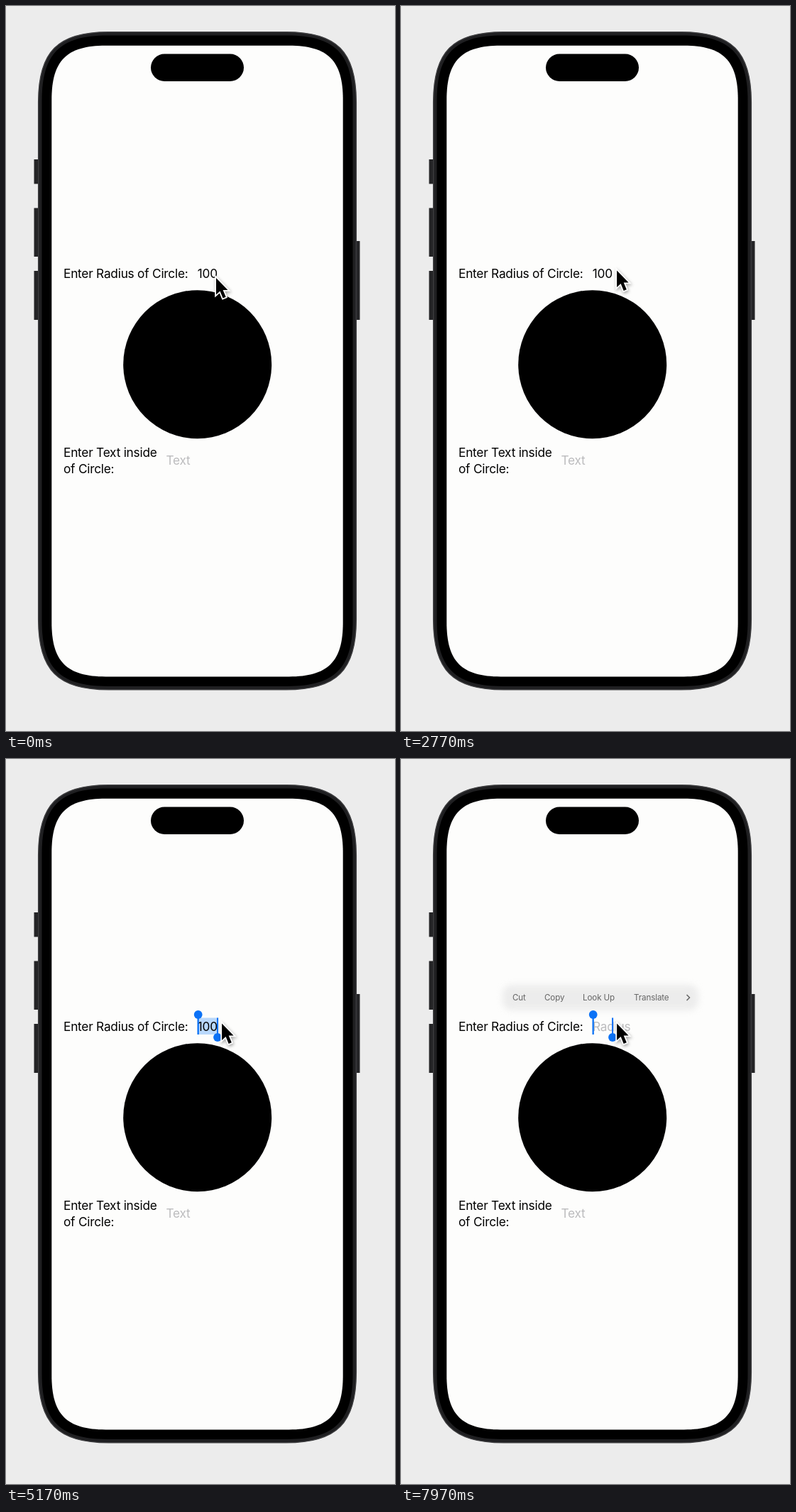
These frames come from a looping animation (548 by 1021 pixels, 8000 ms). An HTML page:

```html
<!DOCTYPE html>
<html lang="en">
<head>
<meta charset="utf-8">
<title>Circle radius demo</title>
<style>
  html, body { margin: 0; width: 100%; height: 100%; overflow: hidden; background: #ececec; }
  svg { display: block; width: 548px; height: 1021px; }
  text { font: 17.3px Inter, sans-serif; letter-spacing: -.24px; }
  .hint { fill: #bcbcbe; }
  #menu text { font-size: 11.6px; letter-spacing: -.1px; }
  #menu rect { filter: blur(5px); }
  #cursor { filter: drop-shadow(1px 2px 2px rgba(0, 0, 0, .35)); }
</style>
</head>
<body>
<svg viewBox="0 0 548 1021">
  <rect width="548" height="1021" fill="#ececec"/>
  <path d="M39.500 216h8v34.500h-8zM39.500 284.500h8v68.500h-8zM39.500 373h8v69h-8zM491 331h7.500v111h-7.500z" fill="#242426"/>
  <path id="body" fill="#1f1f21" stroke="#3b3b3d" stroke-width="1.5"/>
  <path id="bezel"/>
  <path id="screen" fill="#fdfdfc"/>
  <rect x="204" y="67.500" width="131" height="38.500" rx="19.250"/>

  <text x="81" y="383">Enter Radius of Circle:</text>
  <circle cx="269.700" cy="504.700" r="104.500"/>
  <text x="81" y="635">Enter Text inside</text>
  <text x="81" y="657.500">of Circle:</text>
  <text class="hint" x="225.500" y="646">Text</text>

  <rect id="highlight" x="270" y="364.500" width="29" height="23.500" fill="#b9d8fb"/>
  <text id="value" x="269.800" y="383">100</text>
  <text id="hint" class="hint" x="270" y="383">Radius</text>

  <g id="menu">
    <rect x="143" y="318" width="276" height="36" rx="13" fill="#e2e2e2"/>
    <text x="157" y="340">Cut</text>
    <text x="202" y="340">Copy</text>
    <text x="256" y="340">Look Up</text>
    <text x="328" y="340">Translate</text>
    <path d="M402.500 332l4 4-4 4" fill="none" stroke="#000" stroke-width="1.500"/>
  </g>

  <g id="handles" fill="#0b72f6">
    <rect x="269.500" y="360" width="2.300" height="28"/>
    <circle cx="270.700" cy="360" r="5.900"/>
    <rect x="297" y="364.500" width="2.100" height="28"/>
    <circle cx="298" cy="392" r="5.900"/>
  </g>

  <g id="ring" fill="none">
    <circle cx="301.700" cy="368" stroke="#fff" stroke-width="4.500"/>
    <circle cx="301.700" cy="368" stroke="#000" stroke-width="2.300"/>
  </g>
  <path id="cursor" d="M0 0V23.500L5.500 18.500L9.600 28.500L13.700 26.800L9.600 17H16.500Z" stroke="#fff" stroke-width="3.600" paint-order="stroke"/>
</svg>
<script>
const LOOP = 8000;
const $ = id => document.getElementById(id);
const ramp = (t, from, to) => Math.min(1, Math.max(0, (t - from) / (to - from)));
const ease = p => p * p * (3 - 2 * p);
const show = (id, opacity) => $(id).setAttribute('opacity', opacity);

// Rounded rectangle with continuous-curvature corners
function squircle(x0, y0, x1, y1, r) {
  const e = 1.28 * r, c = .355 * r;
  return `M${x0} ${y0 + e}C${x0} ${y0 + c} ${x0 + c} ${y0} ${x0 + e} ${y0}` +
    `H${x1 - e}C${x1 - c} ${y0} ${x1} ${y0 + c} ${x1} ${y0 + e}` +
    `V${y1 - e}C${x1} ${y1 - c} ${x1 - c} ${y1} ${x1 - e} ${y1}` +
    `H${x0 + e}C${x0 + c} ${y1} ${x0} ${y1 - c} ${x0} ${y1 - e}Z`;
}
$('body').setAttribute('d', squircle(45.7, 36.7, 493.3, 962.8, 77));
$('bezel').setAttribute('d', squircle(50.5, 41.5, 488.5, 958, 72));
$('screen').setAttribute('d', squircle(64.3, 55.8, 474.7, 944.5, 59.5));

function draw(t) {
  const move = ease(ramp(t, 0, 580));
  const settle = ease(ramp(t, 1200, 1600));
  const x = 296 + 10.3 * move - 2.2 * settle;
  const y = 383 - 15 * move + 4.5 * settle;
  $('cursor').setAttribute('transform', `translate(${x} ${y})`);

  const grow = ramp(t, 1900, 2040);
  for (const circle of $('ring').children) circle.setAttribute('r', 12 + 26 * grow);
  show('ring', t < 1900 ? 0 : 1 - ramp(t, 2060, 2220));

  const selected = ramp(t, 3280, 3480);
  const cleared = t >= 7900;
  show('handles', selected);
  show('highlight', cleared ? 0 : selected);
  show('value', cleared ? 0 : 1);
  show('hint', cleared ? 1 : 0);
  show('menu', .6 * ramp(t, 7800, 7970));
}

function tick(now) {
  draw(now % LOOP);
  requestAnimationFrame(tick);
}
draw(0);
requestAnimationFrame(tick);
</script>
</body>
</html>
```
